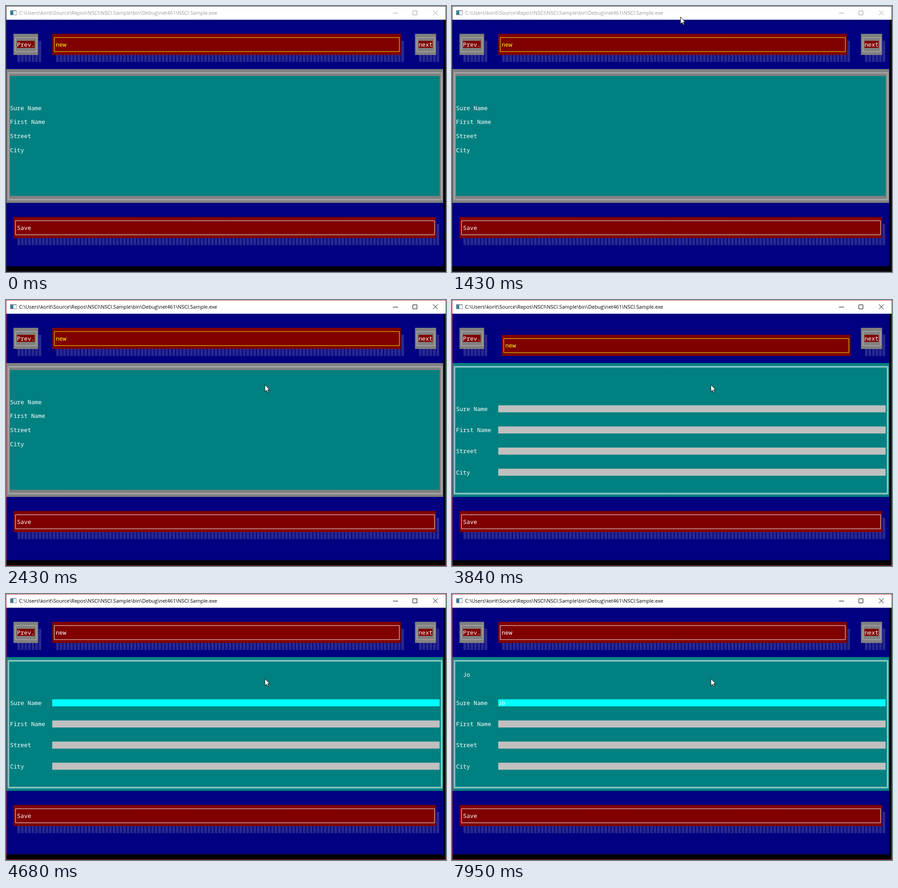
These frames come from a looping animation (962 by 582 pixels, 8 s). An HTML page with a canvas:

```html
<!DOCTYPE html>
<html lang="en">
<head>
<meta charset="utf-8">
<title>Console form</title>
<style>
  html, body { margin: 0; height: 100%; overflow: hidden; background: #000; }
  canvas { display: block; }
</style>
</head>
<body>
<canvas id="stage" width="962" height="582"></canvas>
<script>
const LOOP = 8000;
const NAVY = '#000080', MAROON = '#800000', TEAL = '#008080';
const GRAY = '#808080', SILVER = '#c0c0c0', WHITE = '#fff', YELLOW = '#ff0', CYAN = '#0ff';

// The console is a grid of 8 by 16 cells, shown slightly reduced
const CW = 8, CH = 16, SX = 0.9625, SY = 0.9635;
const ctx = document.getElementById('stage').getContext('2d');
ctx.lineJoin = 'round';

function rect(color, x0, y0, x1, y1) {
  ctx.fillStyle = color;
  ctx.fillRect(x0, y0, x1 - x0, y1 - y0);
}

function cells(color, c0, r0, c1, r1) {
  rect(color, c0 * CW, r0 * CH, c1 * CW, r1 * CH);
}

function write(str, col, row, color = WHITE) {
  ctx.font = '13.33px "Noto Sans Mono", monospace';
  ctx.fillStyle = color;
  [...str].forEach((ch, i) => ctx.fillText(ch, (col + i) * CW, row * CH + 13));
}

// Thin frame through the outermost cells; grow moves it outwards
function frame(color, c0, r0, c1, r1, grow = 0) {
  const x = c0 * CW + 4.5 - grow, y = r0 * CH + 8.5 - grow;
  ctx.strokeStyle = color;
  ctx.lineWidth = 1;
  ctx.strokeRect(x, y, (c1 - c0 - 1) * CW + 2 * grow, (r1 - r0 - 1) * CH + 2 * grow);
}

function makeShade() {
  const tile = document.createElement('canvas');
  tile.width = CW;
  tile.height = CH;
  const t = tile.getContext('2d');
  t.fillStyle = '#a8a8c0';
  for (let y = 0; y < CH; y += 2) {
    for (let x = 1 + y / 2 % 2; x < CW - 1; x += 2) t.fillRect(x, y, 1, 1);
  }
  return ctx.createPattern(tile, 'repeat');
}
const shade = makeShade();

function button(label, c0, r0, c1, { back = MAROON, line = WHITE, ink = WHITE, pressed = false } = {}) {
  if (pressed) {
    c0++; c1++; r0++;
  } else {
    cells(shade, c0 + 1, r0 + 1, c1 + 1, r0 + 4);
  }
  cells(back, c0, r0, c1, r0 + 3);
  frame(line, c0, r0, c1, r0 + 3);
  cells(MAROON, c0 + 1, r0 + 1, c0 + 1 + label.length, r0 + 2);
  write(label, c0 + 1, r0 + 1, ink);
}

function titleBar(active) {
  const ink = active ? '#000' : '#999';
  rect(WHITE, 1, 1, 961, 30);

  rect('#8a949c', 9, 9, 23, 20);
  rect(WHITE, 10, 11, 22, 19);
  rect('#2f7f96', 10, 11, 16, 19);

  ctx.font = '11.07px "Open Sans", sans-serif';
  ctx.fillStyle = ink;
  ctx.fillText('C:\\Users\\korit\\Source\\Repos\\NSCI\\NSCI.Sample\\bin\\Debug\\net461\\NSCI.Sample.exe', 28.5, 19);

  rect(ink, 846, 15, 857, 16);
  ctx.strokeStyle = ink;
  ctx.lineWidth = 1;
  ctx.strokeRect(889.5, 10.5, 9, 9);
  ctx.beginPath();
  ctx.moveTo(933.5, 9.5);
  ctx.lineTo(944, 20);
  ctx.moveTo(944, 9.5);
  ctx.lineTo(933.5, 20);
  ctx.stroke();

  ctx.strokeStyle = active ? '#c0454a' : '#3a3a3a';
  ctx.strokeRect(0.5, 0.5, 961, 581);
}

function form(open, focused, typed) {
  cells(open ? TEAL : GRAY, 0, 7, 124, 26);
  cells(TEAL, 1, 8, 123, 25);
  const line = open ? WHITE : SILVER;
  frame(line, 0, 7, 124, 26, 1);
  frame(line, 0, 7, 124, 26, -1);

  ['Sure Name', 'First Name', 'Street', 'City'].forEach((label, i) => {
    const row = open ? 13 + 3 * i : 12 + 2 * i;
    write(label, 1, row);
    if (open) cells(focused && i === 0 ? CYAN : SILVER, 13, row, 123, row + 1);
  });
  write(typed, 3, 9);
  write(typed, 13, 13);
}

// Pointer stops: [time, x, y], each held until the next
const stops = [];
function glide(start, end, count, x0, y0, x1, y1) {
  for (let i = 0; i < count; i++) {
    const p = i / (count - 1), e = 1 - (1 - p) ** 1.2;
    stops.push([start + (end - start) * p, x0 + (x1 - x0) * e, y0 + (y1 - y0) * e]);
  }
}
glide(180, 950, 11, 797, 516, 513, 57);
glide(1040, 1580, 8, 510, 50, 496, 16);
stops.push([1730, 495, 15], [1810, 494, 14], [2360, 530, 95], [2430, 565.5, 184.8]);

const arrow = new Path2D('M.5 .5V16.5L4.2 13L6.8 18.5L9 17.5L6.7 12H11.4Z');

function pointer(t) {
  const stop = stops.filter(s => s[0] <= t).pop();
  if (!stop) return;
  ctx.setTransform(SX, 0, 0, SY, stop[1], stop[2]);
  ctx.fillStyle = WHITE;
  ctx.strokeStyle = '#000';
  ctx.lineWidth = 1;
  ctx.fill(arrow);
  ctx.stroke(arrow);
}

function draw(t) {
  const open = t >= 3840, focused = t >= 4680;
  const typed = t >= 7950 ? 'Jo' : t >= 7630 ? 'J' : '';
  const accent = focused ? WHITE : YELLOW;
  const side = { back: GRAY, line: SILVER };

  ctx.setTransform(1, 0, 0, 1, 0, 0);
  rect('#000', 0, 0, 962, 582);
  titleBar(t >= 1730);

  ctx.setTransform(SX, 0, 0, SY, 1, 30);
  cells(NAVY, 0, 0, 124, 35);
  button('Prev.', 2, 2, 9, side);
  button('new', 13, 2, 112, { line: accent, ink: accent, pressed: open && t < 4220 });
  button('next', 116, 2, 122, side);
  form(open, focused, typed);
  button('Save', 2, 28, 122);
  pointer(t);
}

function tick() {
  draw(performance.now() % LOOP);
  requestAnimationFrame(tick);
}
tick();
</script>
</body>
</html>
```
